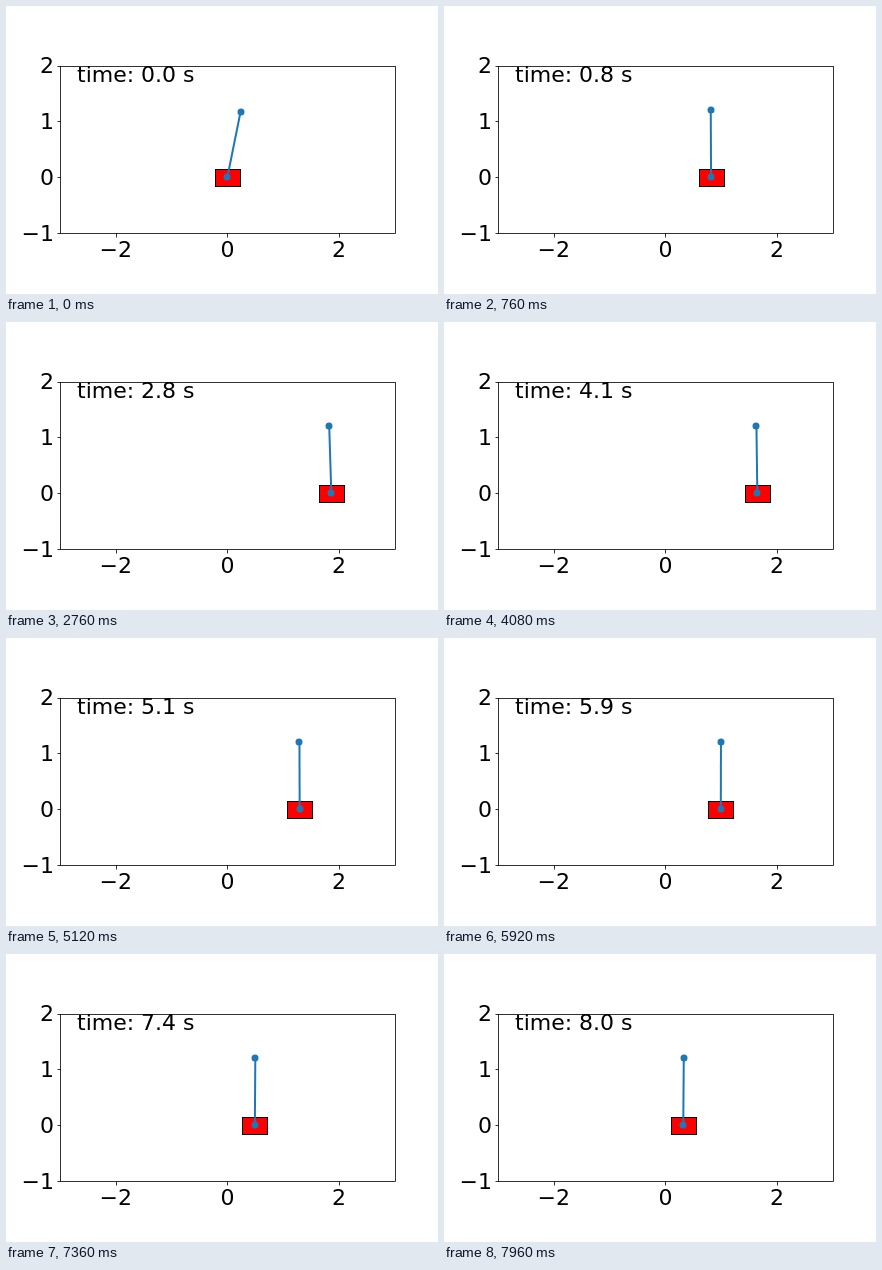
An HTML page with a canvas for the animation above (8000 ms loop, 432 by 288 pixels).

```html
<!DOCTYPE html>
<html lang="en">
<head>
<meta charset="utf-8">
<title>Cart and pole</title>
<style>
  html, body { margin: 0; width: 100%; height: 100%; overflow: hidden; background: #fff; }
  canvas { display: block; }
</style>
</head>
<body>
<canvas id="stage" width="432" height="288"></canvas>
<script>
const ctx = document.getElementById('stage').getContext('2d');
const LOOP = 8000, STEP = 40;
const UNIT = 55.8, ORIGIN_X = 221.4, ORIGIN_Y = 171.18;
const CART_W = 0.45, CART_H = 0.3, POLE = 1.2, GRAVITY = 9.8;
const BLUE = '#1f77b4';

const toX = x => ORIGIN_X + x * UNIT;
const toY = y => ORIGIN_Y - y * UNIT;
const round = v => Math.floor(v + 0.5);
const snap = v => round(v) + 0.5;

// Cart position and pole angle: a slow damped swing plus a quick start-up term.
function pose(t) {
  const decay = 0.2425, freq = 0.3259, peak = 1.868;
  const stiffness = decay ** 2 + freq ** 2;
  const s = t - 2.74;
  const swing = peak * Math.exp(-decay * s);
  const sin = Math.sin(freq * s), cos = Math.cos(freq * s);
  const slowX = swing * (cos + decay / freq * sin);
  const slowV = -swing * stiffness / freq * sin;
  const slowA = -2 * decay * slowV - stiffness * slowX;
  return {
    x: slowX - (0.173 + 1.859 * t) * Math.exp(-2.47 * t),
    angle: slowA / GRAVITY + (0.273 + 1.026 * t) * Math.exp(-3.8 * t)
  };
}

function line(x1, y1, x2, y2) {
  ctx.beginPath();
  ctx.moveTo(x1, y1);
  ctx.lineTo(x2, y2);
  ctx.stroke();
}

function dot(x, y) {
  ctx.beginPath();
  ctx.arc(round(x), round(y), 3.5, 0, 2 * Math.PI);
  ctx.fill();
}

function label(text, x, y, align) {
  ctx.textAlign = align;
  ctx.fillText(text, x, y);
}

const signed = n => String(n).replace('-', '\u2212');

function drawAxes() {
  ctx.strokeStyle = ctx.fillStyle = '#000';
  ctx.lineWidth = 0.8;
  ctx.strokeRect(54.5, 60.5, 335, 167);
  for (const n of [-2, 0, 2]) {
    const x = snap(toX(n));
    line(x, 227.5, x, 231.5);
    label(signed(n), toX(n), 251, 'center');
  }
  for (const n of [-1, 0, 1, 2]) {
    const y = snap(toY(n));
    line(51.5, y, 54.5, y);
    label(signed(n), 48, Math.floor(toY(n) + 8.4), 'right');
  }
}

function drawCart({ x, angle }) {
  const left = snap(toX(x - CART_W / 2)), right = snap(toX(x + CART_W / 2));
  const top = snap(toY(CART_H / 2)), bottom = snap(toY(-CART_H / 2));
  ctx.fillStyle = '#f00';
  ctx.strokeStyle = '#000';
  ctx.lineWidth = 1;
  ctx.fillRect(left, top, right - left, bottom - top);
  ctx.strokeRect(left, top, right - left, bottom - top);

  const baseX = toX(x), tipX = toX(x + POLE * Math.sin(angle));
  const baseY = toY(0), tipY = toY(POLE * Math.cos(angle));
  ctx.strokeStyle = ctx.fillStyle = BLUE;
  ctx.lineWidth = 2;
  line(baseX, baseY, tipX, tipY);
  dot(baseX, baseY);
  dot(tipX, tipY);
}

function draw(ms) {
  const t = Math.floor(ms % LOOP / STEP) * STEP / 1000;
  ctx.fillStyle = '#fff';
  ctx.fillRect(0, 0, 432, 288);
  ctx.font = '22px "DejaVu Sans", sans-serif';
  drawCart(pose(t));
  drawAxes();
  label(`time: ${t.toFixed(1)} s`, 71, 76, 'left');
}

let start;
function tick(now) {
  start ??= now;
  draw(Math.max(0, now - start));
  requestAnimationFrame(tick);
}
draw(0);
requestAnimationFrame(tick);
</script>
</body>
</html>
```
